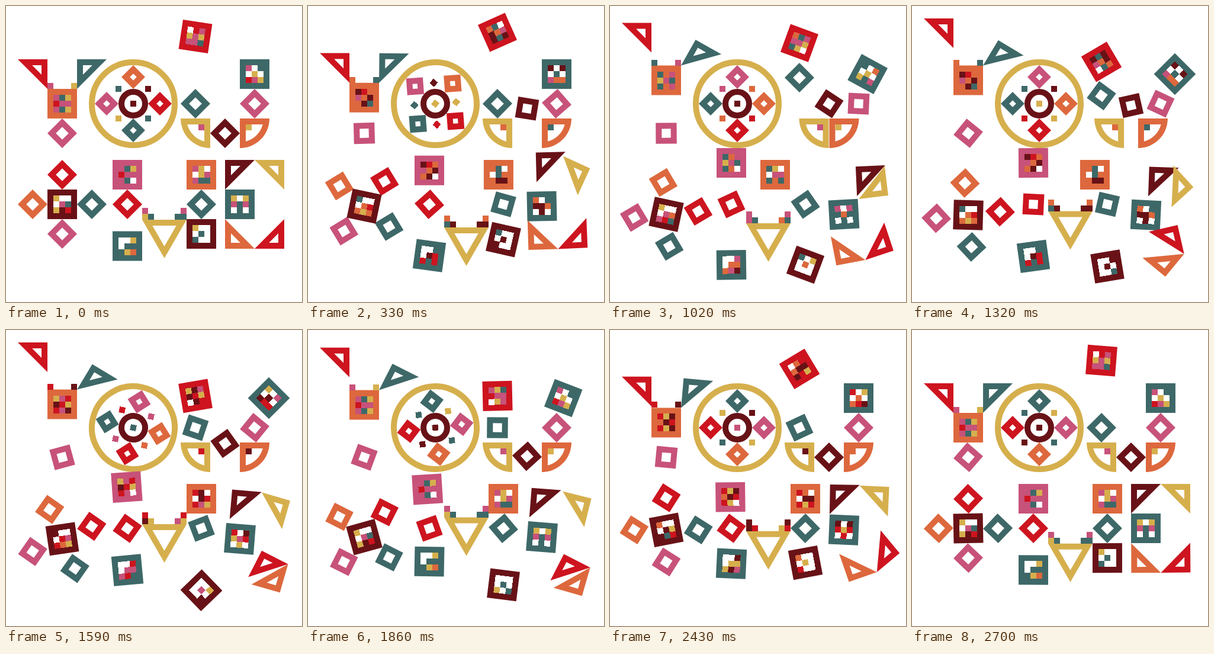
Recreate the animation shown at these times as an HTML page. Size 500x500 px, loop 2730 ms.

```html
<!DOCTYPE html>
<html lang="en">
<head>
<meta charset="utf-8">
<title>Folk mosaic</title>
<style>
html, body { margin: 0; width: 100%; height: 100%; overflow: hidden; background: #fff; }
svg { display: block; width: 100vw; height: 100vh; }
</style>
</head>
<body>
<svg id="stage" viewBox="0 0 500 500"></svg>
<script>
const LOOP = 2730;
const COLORS = { r: '#cd141f', b: '#681217', t: '#3e6868', g: '#d6af4d', o: '#dd683d', p: '#c7527a' };
// Each kind of tile runs through its own five colours.
const TILES = {
  A: 'pobpr', B: 'gtogb', C: 'tbrtg', D: 'trgop', E: 'gtbpb', F: 'portr', G: 'bgpbt', H: 'gobpr',
  I: 'bgtro', J: 'rortg', K: 'rpogb', L: 'pbrtg', M: 'tbgop', N: 'gtbpr', O: 'orpbt'
};
const stage = document.getElementById('stage');
const updates = [];

function el(parent, tag, attrs) {
  const e = document.createElementNS('http://www.w3.org/2000/svg', tag);
  for (const k in attrs) e.setAttribute(k, attrs[k]);
  return parent.appendChild(e);
}

// Motion: a track is a number or a function of time.
const at = (track, t) => typeof track === 'function' ? track(t) : track;
const sine = u => (1 - Math.cos(Math.PI * Math.min(1, Math.max(0, u)))) / 2;
const cubic = u => u <= 0 ? 0 : u >= 1 ? 1 : u < 0.5 ? 4 * u ** 3 : 1 - 4 * (1 - u) ** 3;
const wave = (mid, size) => t => mid + size * Math.sin(2 * Math.PI * t / LOOP);
const spin = (from, turn) => t => from + turn * t / LOOP;
const swing = (from, to, up, down = LOOP - up) => t =>
  from + (to - from) * (sine(t / up) - sine((t - down) / (LOOP - down)));
// Sine-eased steps from a first value through [time, value] points.
const path = (first, ...points) => t => {
  let value = first, from = 0;
  for (const [time, next] of points) {
    value += (next - value) * sine((t - from) / (time - from));
    if (t <= time) break;
    from = time;
  }
  return value;
};

function colorStep(t) {
  const p = t % 900;
  return p < 90 || p >= 840 ? 0 : p < 240 ? 3 : p < 465 ? 1 : p < 660 ? 2 : 4;
}

function cell(parent, x, y, kind) {
  const e = el(parent, 'rect', { x, y, width: 10, height: 10, 'shape-rendering': 'crispEdges' });
  if (kind === '.') e.setAttribute('fill', '#fff');
  else updates.push((t, step) => e.setAttribute('fill', COLORS[TILES[kind][step]]));
}

function part(x, y, a = 0) {
  const g = el(stage, 'g', {});
  updates.push(t => g.setAttribute('transform',
    `translate(${at(x, t)} ${at(y, t)}) rotate(${at(a, t)})`));
  return g;
}

function shape(parent, c, d, transform = '') {
  return el(parent, 'path', { d, fill: COLORS[c], 'fill-rule': 'evenodd', transform });
}

function frame(parent, c, side) {
  const o = side / 2, i = o - 10;
  return shape(parent, c, `M${-o} ${-o}H${o}V${o}H${-o}ZM${-i} ${-i}H${i}V${i}H${-i}Z`);
}

const diamond = (c, x, y, a) => frame(part(x, y, a), c, 35.36);

function box(c, x, y, a, tiles) {
  const g = part(x, y, a);
  shape(g, c, 'M-25-25H25V25H-25Z');
  [...tiles].forEach((kind, i) => cell(g, i % 3 * 10 - 15, Math.floor(i / 3) * 10 - 15, kind));
}

function corner(c, x, y, a, transform) {
  shape(part(x, y, a), c, 'M0 0H50L0 50ZM10 10H25.9L10 25.9Z', transform);
}

// Horned figure
const hornY = swing(140, 100.5, 970);
corner('r', 70, swing(90, 21, 1300, 1600), 0, 'scale(-1 1)');
corner('t', 120, hornY, path(0, [250, 0], [1150, 31], [1590, 31], [LOOP, 0]), 'translate(0 -50)');
box('o', 95, t => hornY(t) + 25, 0, 'LDHKALFME');
const ears = part(0, hornY);
cell(ears, 70, -10, 'F');
cell(ears, 110, -10, 'E');
diamond('p', 95, 215, spin(45, 360));

// Wheel
const quarter = LOOP / 4;
const wheel = part(215, 165, t => 90 * (cubic(t / quarter) + cubic(t / quarter - 2)));
for (const r of [70, 20]) {
  el(wheel, 'circle', { r, fill: 'none', stroke: COLORS[r > 50 ? 'g' : 'b'], 'stroke-width': 10 });
}
[...'ortp'].forEach((c, i) => frame(
  el(wheel, 'g', { transform: `rotate(${i * 90}) translate(0 -45) rotate(45)` }), c, 28.28));
[...'MIND'].forEach((kind, i) => cell(wheel, i % 2 * 50 - 30, i < 2 ? -30 : 20, kind));
cell(wheel, -5, -5, 'G');

// Top right
const lead = path(0, [1000, 57], [1300, 57], [2150, 0]);
box('r', 320, path(51.5, [400, 44], [680, 44], [1650, 112], [1800, 112], [LOOP, 51.5]),
  t => 8.5 + 360 * t / LOOP + lead(t), '.KLBAEALM');
const tilt = path(0, [682, 0], [1260, 1], [1600, 1], [2100, 0]);
box('t', t => 420 + 24 * tilt(t), 115, t => 45 * tilt(t), 'L.M.B.KFH');
diamond('t', 320, path(165, [480, 165], [1020, 121], [1500, 165]),
  path(45, [300, 45], [1020, -45], [2160, -98], [LOOP, -135]));
diamond('b', 370, path(215, [450, 165], [1200, 165], [1950, 215]),
  path(45, [430, 4], [1670, -127], [2000, -135]));
diamond('p', 420, 165, path(45, [95, 45], [1875, 135]));

const slide = path(0, [330, 0], [700, 24.5], [1100, 24.5], [1560, 0]);
function fan(c, x, side, kind) {
  const g = part(t => x + side * (50 - slide(t)), 190);
  shape(g, c, 'M0 0H50A50 50 0 0 1 0 50ZM10 10H38.73A40 40 0 0 1 10 38.73Z', `scale(${side} 1)`);
  cell(g, side > 0 ? 10 : -20, 10, kind);
}
fan('g', 395, -1, 'A');
fan('o', 345, 1, 'B');

// Orbiting flower
const sinkY = swing(335, 353, 1200);
const orbit = path(0, [450, 47], [1100, 86], [1200, 86], [2450, 0]);
const reach = swing(50, 54.2, 300);
const petalTurn = wave(45, 20);
[...'rtpo'].forEach((c, i) => {
  const angle = t => (orbit(t) + i * 90) * Math.PI / 180;
  diamond(c, t => 95 + reach(t) * Math.sin(angle(t)),
    t => sinkY(t) - reach(t) * Math.cos(angle(t)), petalTurn);
});
box('b', 95, sinkY, wave(0, 17), 'B...ADHIJ');

// Middle column
box('p', path(205, [1350, 205], [2050, 201], [LOOP, 205]), swing(285, 265, 800, 1500),
  path(0, [1250, 0], [1600, -4], [LOOP, 0]), 'LDHKALFM.');
diamond('r', 205, 335, path(45, [650, 52], [LOOP, 225]));
box('t', 205, path(405.5, [700, 441], [800, 441], [2150, 385], [LOOP, 405.5]),
  path(0, [550, 12], [1350, -8], [2160, 5], [LOOP, 0]), '..N.MDDNO');

const cup = part(267.5, path(361, [520, 379.5], [620, 379.5], [2000, 315], [2100, 315], [LOOP, 361]));
shape(cup, 'g', 'M-37.5 0H37.5L0 65ZM-20.2 10H20.2L0 45Z');
[...'ECMC'].forEach((kind, i) => cell(cup, [-37.5, -27.5, 17.5, 27.5][i], -10, kind));
cell(cup, -37.5, -20, 'A');
cell(cup, 27.5, -20, 'A');

// Right column
box('o', path(330, [150, 330], [840, 279], [1020, 279], [1560, 330]), 285, 0, 'FB..EAFMC');
diamond('t', 330, 335, path(45, [390, 14], [2000, -133], [LOOP, -135]));
box('b', 330, swing(385, 440, 1200), t => 360 * sine(t / LOOP), 'B...M.C..');

// Corner frame
corner('b', path(370, [850, 415], [1000, 415], [1750, 378], [LOOP, 370]),
  path(260, [380, 247], [1100, 272], [LOOP, 260]), path(0, [800, -4], [1650, 5], [LOOP, 0]));
corner('g', path(470, [400, 477], [1020, 470], [1590, 480], [LOOP, 470]),
  path(260, [1020, 320], [1700, 286], [LOOP, 260]),
  path(0, [900, 83], [1020, 83], [1600, 16], [LOOP, 0]), 'scale(-1 1)');
box('t', 395, sinkY, path(0, [900, -4], [1500, 4.5], [2160, 4.5], [LOOP, 0]), 'H.ELMF.C.');

// Two triangles hinged at a shared tip
const hingeX = path(420, [900, 428], [1600, 476.5], [2160, 477], [LOOP, 420]);
const hingeY = path(410, [250, 410], [1150, 430], [1590, 395.5], [2160, 408], [LOOP, 410]);
const fold = (start, end) => path(0, [900, start], [1600, end], [1850, end], [LOOP, 0]);
corner('r', hingeX, hingeY, fold(-8, -153), 'translate(50 0) scale(-1 -1)');
corner('o', hingeX, hingeY, fold(-6, -74), 'translate(-50 0) scale(1 -1)');

function render(t) {
  const step = colorStep(t);
  for (const update of updates) update(t, step);
}

let start;
function tick(now) {
  if (start === undefined) start = now;
  render((now - start) % LOOP);
  requestAnimationFrame(tick);
}
render(0);
requestAnimationFrame(tick);
</script>
</body>
</html>
```
